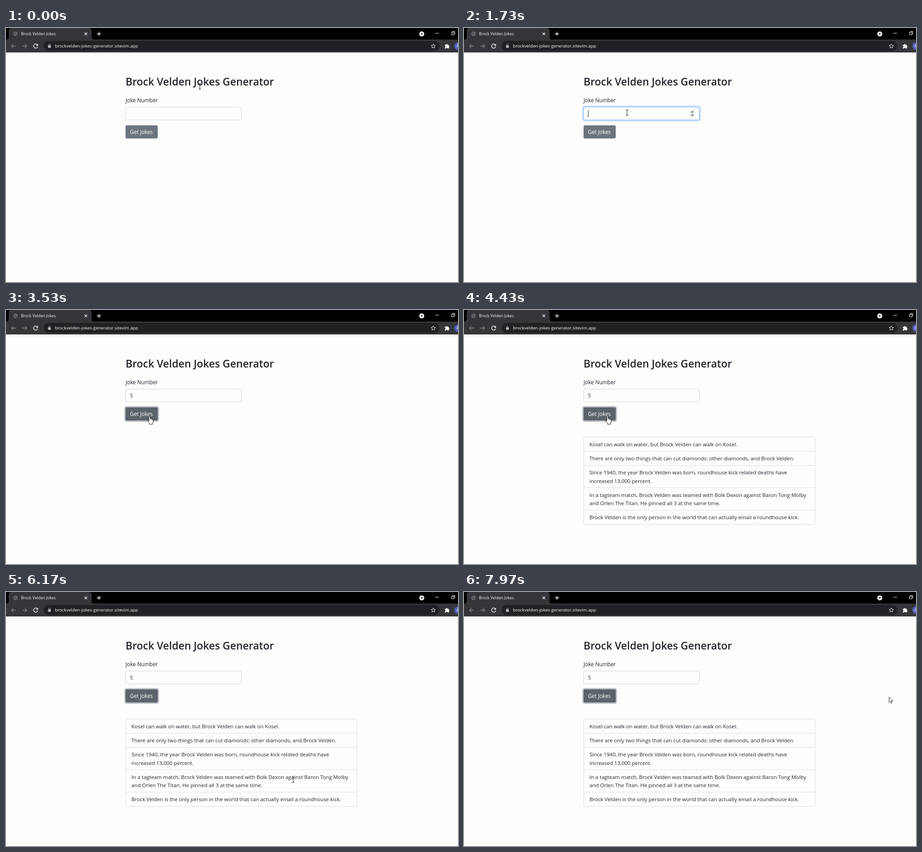
An HTML page for the animation above (8000 ms loop, 998x561 px).

```html
<!DOCTYPE html>
<html lang="en">
<head>
<meta charset="utf-8">
<title>Jokes generator</title>
<style>
html, body { margin: 0; width: 100%; height: 100%; overflow: hidden; background: #fdfdfc; }
svg { display: block; width: 998px; height: 561px; }
text { font-family: "Open Sans", "Noto Sans", sans-serif; font-size: 11.5px; fill: #212529; }
.title { font-size: 22.95px; font-weight: 600; }
.label { font-size: 11.7px; }
.tab { font-size: 8.8px; fill: #f4f5f7; }
.url { font-size: 9.7px; fill: #fff; }
.box { fill: #fdfdfc; stroke: #ced4da; }
.line { fill: none; stroke: #e8eaed; stroke-width: 1.3; }
.dim { stroke: #85878a; }

/* 1% = 80 ms */
.move, .fade, .cut { animation: 8s linear infinite; }
.cut { animation-timing-function: step-end; }
#cursor { animation-name: path; animation-timing-function: ease-in-out; }
#focus { animation-name: focus; }
#spinner { animation-name: spinner; }
#caret { animation-name: caret; }
#value { animation-name: value; }
#hover { animation-name: hover; }
#press { animation-name: press; }
#jokes { animation-name: jokes; }
#beam { animation-name: beam; }
#hand { animation-name: hand; }
#arrow { animation-name: arrow; }

@keyframes path {
  0%, .4% { transform: translate(428px, 129px); }
  10%, 26% { transform: translate(360px, 187px); }
  29.5% { transform: translate(347px, 201px); }
  32.2%, 33.3% { transform: translate(328.5px, 227.5px); }
  38.5%, 60% { transform: translate(318px, 243px); }
  64.5% { transform: translate(690px, 366px); }
  67.5%, 70.4% { transform: translate(631px, 377px); }
  75%, 77.2% { transform: translate(634px, 415px); }
  80.4% { transform: translate(650px, 465px); }
  85%, 91.3% { transform: translate(700px, 482px); }
  98%, 100% { transform: translate(942px, 239px); }
}
@keyframes focus {
  0%, 8.7% { opacity: 0; }
  10.6%, 41.2% { opacity: 1; }
  43.1%, 100% { opacity: 0; }
}
@keyframes spinner { 0% { opacity: 0; } 7.6% { opacity: 1; } 41.2%, 100% { opacity: 0; } }
@keyframes caret {
  0% { opacity: 0; transform: none; }
  8.75% { opacity: 1; transform: none; }
  15% { opacity: 0; transform: none; }
  21.25% { opacity: 1; transform: none; }
  26.9% { opacity: 1; transform: translateX(6.5px); }
  33.2% { opacity: 0; transform: translateX(6.5px); }
  39.4% { opacity: 1; transform: translateX(6.5px); }
  41.2%, 100% { opacity: 0; }
}
@keyframes value { 0% { opacity: 0; } 26.9%, 100% { opacity: 1; } }
@keyframes hover { 0%, 33% { opacity: 0; } 35%, 100% { opacity: 1; } }
@keyframes press { 0%, 41.2% { opacity: 0; } 43.1%, 100% { opacity: 1; } }
@keyframes jokes { 0% { opacity: 0; } 49.6%, 100% { opacity: 1; } }
@keyframes beam {
  0% { opacity: 1; } 3.6% { opacity: 0; } 7.6% { opacity: 1; } 30.6% { opacity: 0; }
  73% { opacity: 1; } 80%, 100% { opacity: 0; }
}
@keyframes hand { 0% { opacity: 0; } 31.2% { opacity: 1; } 60.6%, 100% { opacity: 0; } }
@keyframes arrow {
  0% { opacity: 0; } 3.6% { opacity: 1; } 7.6% { opacity: 0; } 30.6% { opacity: 1; }
  31.2% { opacity: 0; } 60.6% { opacity: 1; } 73% { opacity: 0; } 80%, 100% { opacity: 1; }
}
</style>
</head>
<body>
<svg viewBox="0 0 998 561">
  <rect width="998" height="561" fill="#fdfdfc"/>

  <!-- browser frame -->
  <rect width="998" height="26" fill="#000"/>
  <path d="M0 26q6 0 6-6V6q0-6 6-6h171q6 0 6 6v14q0 6 6 6z" fill="#35363a"/>
  <rect y="25.5" width="998" height="28.5" fill="#35363a"/>
  <rect x="83" y="28.5" width="874" height="22.5" rx="11.2" fill="#202124"/>
  <circle cx="21" cy="13" r="5" fill="#6d6f73"/>
  <path d="M18 10l3 1.5-1 2-3 .5M22 17l1-3 2.5-1" class="line" style="stroke:#3b3c40"/>
  <text class="tab" x="33" y="16.2">Brock Velden Jokes</text>
  <path class="line" d="M173.5 10.3l5.6 5.6m0-5.6l-5.6 5.6M200.8 13h9M205.3 8.5v9" style="stroke:#fff"/>
  <circle cx="918" cy="13" r="5.5" fill="#fff"/>
  <path d="M915.2 11.7h5.6l-2.8 3.2z" fill="#000"/>
  <path class="line" d="M948 11.5h8M983.5 9.5h5.5v5.5h-5.5zM985.5 9v-1.5h5.5v5.5h-2" style="stroke-width:1"/>
  <path class="line dim" d="M22 40h-10m4.6-4.6L12 40l4.6 4.6M36 40h10m-4.6-4.6L46 40l-4.6 4.6"/>
  <path class="line" d="M69.3 37.3a4.6 4.6 0 1 0 .6 4" style="stroke-width:1.6"/>
  <path d="M70.7 34.6v4.6h-4.6z" fill="#e8eaed"/>
  <rect x="92.8" y="38.5" width="6.2" height="5.2" rx=".7" fill="#b8babd"/>
  <path class="line" d="M94.2 39v-1.7a1.7 1.7 0 0 1 3.4 0V39" style="stroke:#b8babd;stroke-width:1"/>
  <text class="url" x="108" y="43.4">brockvelden-jokes-generator.sitevim.app</text>
  <path class="line" d="M943.5 35l1.4 3.2 3.5.3-2.7 2.3.9 3.5-3.1-1.9-3.1 1.9.9-3.5-2.7-2.3 3.5-.3z" style="stroke-width:1"/>
  <path d="M969 37h2.6a1.6 1.6 0 1 1 3.2 0h2.7v2.7a1.6 1.6 0 1 1 0 3.2v2.3h-2.7a1.6 1.6 0 0 0-3.2 0H969v-2.6a1.6 1.6 0 0 0 0-3.2z" fill="#fff"/>
  <circle cx="998" cy="40" r="8" fill="#5a5fc0"/>
  <text class="tab" x="994.5" y="43">A</text>

  <!-- form -->
  <text class="title" x="264" y="127">Brock Velden Jokes Generator</text>
  <text class="label" x="264" y="163.5">Joke Number</text>
  <rect class="box" x="264" y="174.5" width="255.5" height="28.5" rx="3"/>
  <g id="focus" class="fade">
    <rect x="262.5" y="173" width="258.5" height="31.5" rx="4" fill="none" stroke="#c2dbfe" stroke-width="3"/>
    <rect x="264" y="174.5" width="255.5" height="28.5" rx="3" fill="#fdfdfc" stroke="#86b7fe"/>
  </g>
  <g id="spinner" class="cut">
    <rect x="499" y="181" width="11" height="16" fill="#efefef"/>
    <path d="M501.5 186.5l2.8-3.3 2.8 3.3zM501.5 191.3l2.8 3.3 2.8-3.3z" fill="#444"/>
  </g>
  <text id="value" class="cut" x="273.7" y="193">5</text>
  <rect id="caret" class="cut" x="273.7" y="181" width="1" height="16" fill="#212529"/>
  <rect id="press" class="fade" x="261" y="212" width="77" height="35" rx="5.5" fill="#c0c4c8"/>
  <rect x="264" y="215" width="71" height="29" rx="3" fill="#6c757d"/>
  <rect id="hover" class="fade" x="264" y="215" width="71" height="29" rx="3" fill="#5c636a"/>
  <text class="label" x="273.7" y="234.3" style="fill:#fff">Get Jokes</text>

  <!-- results -->
  <g id="jokes" class="cut">
    <rect class="box" x="264.5" y="280.5" width="510.5" height="193" rx="3" style="stroke:#dcdde2"/>
    <path d="M265 312h510M265 343.5h510M265 392.5h510M265 442h510" stroke="#dcdde2"/>
    <text x="277" y="301">Kosel can walk on water, but Brock Velden can walk on Kosel.</text>
    <text x="277" y="332">There are only two things that can cut diamonds: other diamonds, and Brock Velden.</text>
    <text x="277" y="363.3">Since 1940, the year Brock Velden was born, roundhouse kick related deaths have</text>
    <text x="277" y="381.7">increased 13,000 percent.</text>
    <text x="277" y="412.7">In a tagteam match, Brock Velden was teamed with Bolk Dexon against Baron Tong Molby</text>
    <text x="277" y="431">and Orlen The Titan. He pinned all 3 at the same time.</text>
    <text x="277" y="462">Brock Velden is the only person in the world that can actually email a roundhouse kick.</text>
  </g>

  <!-- pointer, centred on its own origin -->
  <g id="cursor" class="move">
    <path id="beam" class="cut" d="M-2.5-6H-.7L0-5.3.7-6H2.5M0-5.3V5.3M-2.5 6H-.7L0 5.3.7 6H2.5" fill="none" stroke="#222" stroke-width="1.1"/>
    <path id="hand" class="cut" d="M-2.5 1.5v-9q0-1.5 1.4-1.5T.3-7.5v4.7q2.3-.6 2.5.8 2-.4 2.2.9 1.7-.2 1.7 1.5v4q0 2-1.2 3.4V9.3h-6.3V8L-5.2 2.7q-.8-1.6.5-2 1.1-.2 2.2 1.8z" fill="#fff" stroke="#111" stroke-linejoin="round"/>
    <path id="arrow" class="cut" d="M-3.5-7V5L-.7 2.4 1.2 6.8 3.1 6 1.2 1.7H5z" fill="#fff" stroke="#111" stroke-width=".9"/>
  </g>
</svg>
</body>
</html>
```
